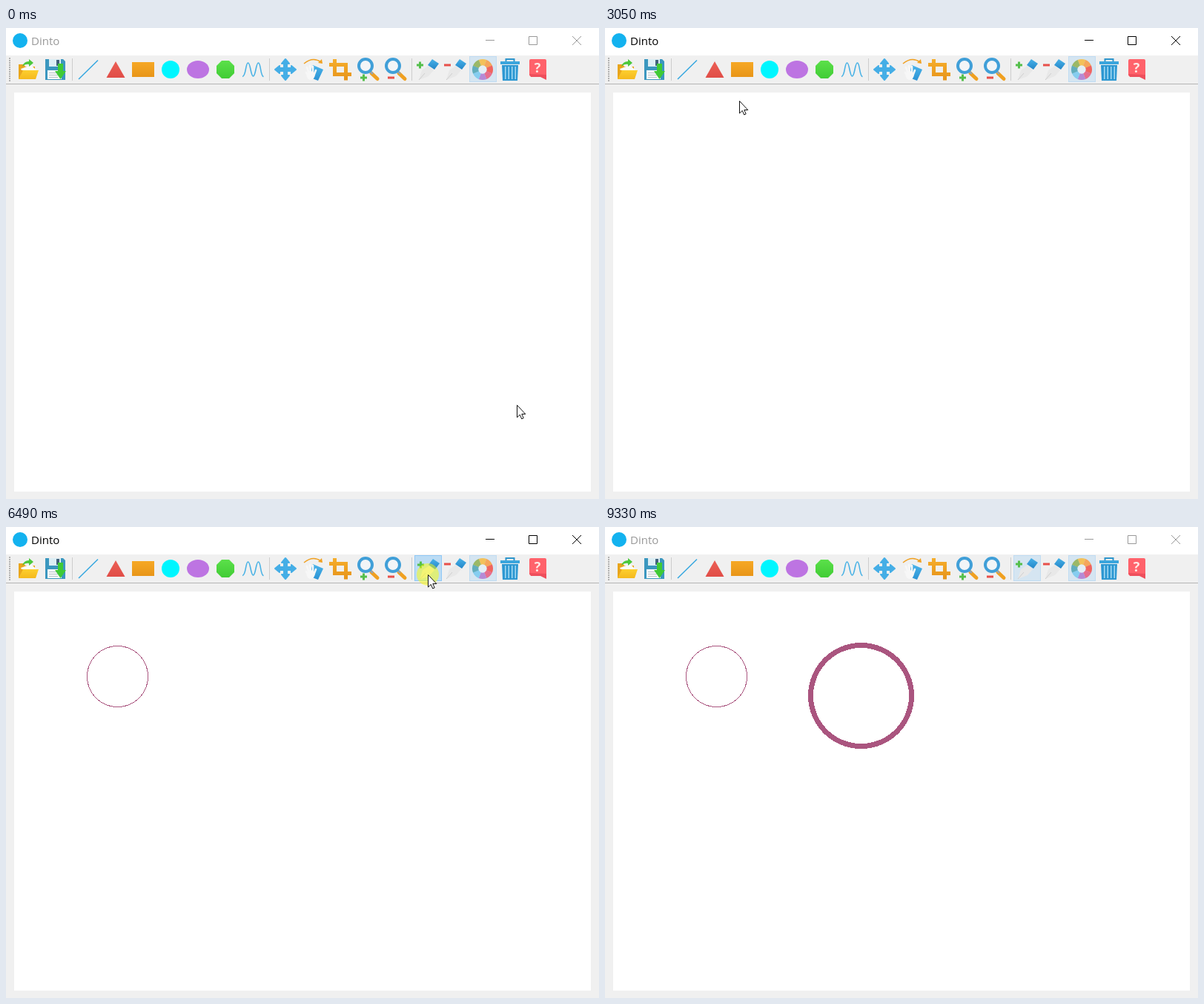
An HTML page with a canvas that plays this animation: 800x635 px, repeating every 9.41 s.

```html
<!DOCTYPE html>
<html lang="en">
<head>
<meta charset="utf-8">
<title>Dinto</title>
<style>
  html, body { margin: 0; width: 100%; height: 100%; overflow: hidden; background: #f0f0f0; }
  canvas { display: block; }
</style>
</head>
<body>
<canvas id="stage" width="800" height="635"></canvas>
<script>
const ctx = document.getElementById('stage').getContext('2d');
const LOOP = 9410;
const INK = '#aa557f';
const BLUE = '#3fa7e0', ORANGE = '#f0a020', GREEN = '#4cc83c', RED = '#e8504a';

// Pointer moves: start, end, steps, from, control, to. Drags begin with a press in place.
const moves = [
  { t0: 70, t1: 390, n: 5, a: [689, 508], c: [650, 290], b: [612, 71] },
  { t0: 2180, t1: 2820, n: 9, a: [612, 71], c: [411, 187], b: [210, 64] },
  { t0: 3050, t1: 3210, n: 3, a: [210, 64], c: [170, 117], b: [109, 159] },
  { t0: 3360, t1: 3680, n: 5, a: [109, 160], c: [155, 200], b: [201, 241], drag: 1 },
  { t0: 3910, t1: 4550, n: 9, a: [201, 241], c: [385, 152], b: [569, 64] },
  { t0: 6660, t1: 7210, n: 8, a: [569, 64], c: [395, 123], b: [222, 62] },
  { t0: 7440, t1: 7760, n: 5, a: [222, 62], c: [247, 106], b: [272, 150] },
  { t0: 7920, t1: 8400, n: 7, a: [277, 159], c: [328, 246], b: [412, 317], drag: 7 },
  { t0: 8550, t1: 8790, n: 4, a: [412, 317], c: [564, 438], b: [716, 559] }
];
const presses = [
  [700, 860], [1090, 1170], [1560, 1710], [2820, 3050], [3360, 3910],
  [4860, 4940], [5170, 5250], [5480, 5560], [5870, 5950], [6260, 6340],
  [6490, 6660], [7210, 7440], [7920, 8550]
];

function progress(m, t) {
  const k = Math.floor((t - m.t0) / (m.t1 - m.t0) * (m.n - 1) + 0.01);
  return Math.min(1, m.drag ? k / (m.n - 1) : (k + 1) / m.n);
}

function along(m, u) {
  const v = 1 - u;
  return m.a.map((a, i) => v * v * a + 2 * u * v * m.c[i] + u * u * m.b[i]);
}

function pointer(t) {
  let p = moves[0].a;
  for (const m of moves) if (t >= m.t0) p = along(m, progress(m, t));
  return p.map(Math.round);
}

function shape(d, fill, stroke, width = 1) {
  const p = new Path2D(d);
  if (fill) { ctx.fillStyle = fill; ctx.fill(p); }
  if (stroke) { ctx.strokeStyle = stroke; ctx.lineWidth = width; ctx.stroke(p); }
}

function rect(x, y, w, h, fill) {
  ctx.fillStyle = fill;
  ctx.fillRect(x, y, w, h);
}

function oval(x, y, rx, ry, fill, stroke, width) {
  ctx.beginPath();
  ctx.ellipse(x, y, rx, ry, 0, 0, 7);
  if (fill) { ctx.fillStyle = fill; ctx.fill(); }
  if (stroke) { ctx.strokeStyle = stroke; ctx.lineWidth = width; ctx.stroke(); }
}

function fade(y0, y1, c0, c1) {
  const g = ctx.createLinearGradient(0, y0, 0, y1);
  g.addColorStop(0, c0);
  g.addColorStop(1, c1);
  return g;
}

function sign(x, y, plus) {
  rect(x - 4, y - 1.5, 9, 3, plus ? '#55bf4c' : RED);
  if (plus) rect(x - 1, y - 4.5, 3, 9, '#55bf4c');
}

// Hard-edged ring, row by row
function ring(cx, cy, r, width) {
  const ro = r + width / 2, ri = r - width / 2;
  const edge = (q, dy) => Math.sqrt(Math.max(0, q * q - dy * dy));
  for (let y = Math.floor(cy - ro); y <= cy + ro; y++) {
    const dy = y + 0.5 - cy;
    if (Math.abs(dy) > ro) continue;
    const out = edge(ro, dy), inn = ri > 0 ? edge(ri, dy) : 0;
    const l = Math.round(cx - out), rr = Math.round(cx + out);
    if (!inn) { rect(l, y, rr - l, 1, INK); continue; }
    const l2 = Math.max(l + 1, Math.round(cx - inn));
    const r2 = Math.min(rr - 1, Math.round(cx + inn));
    rect(l, y, l2 - l, 1, INK);
    rect(r2, y, rr - r2, 1, INK);
  }
}

function drawing(t) {
  for (const m of moves) {
    if (!m.drag || t < m.t0) continue;
    const u = progress(m, t);
    const [x, y] = along(m, Math.max(0, u - 0.03 * (1 - u)));
    const x0 = m.a[0] + 0.5, y0 = Math.round(m.a[1]) + 0.5;
    const d = Math.min(x - m.a[0], y - m.a[1]) + 1;
    if (u > 0) ring(x0 + d / 2, y0 + d / 2, d / 2, m.drag);
  }
}

function zoom(x, plus) {
  ctx.lineCap = 'round';
  shape(`M${x + 5} 61l8 7.5`, null, ORANGE, 5);
  shape(`M${x + 3} 58l3 3`, null, '#9aa4aa', 3);
  ctx.lineCap = 'butt';
  oval(x - 3, 51, 9, 9, '#f2f5f7', '#409fd8', 4);
  sign(x - 6, 67, plus);
}

function pen(x, plus) {
  shape(`M${x - 12} 70l4-13 9-6 7 6-7 8z`, '#e8e8e8');
  shape(`M${x - 12} 70l8-9`, null, '#cfcfcf');
  shape(`M${x} 50l6-8 9 6-6 8z`, fade(42, 56, '#47b1e8', '#2486c8'));
  sign(x - 11, 50, plus);
}

const icons = [
  [30, () => {
    shape('M17 69V49h7l2 3h13v5z', '#e9a51c');
    shape('M20 55l14-5 7 7H21z', '#fafafa');
    shape('M17 69l6-12h21l-4 12z', fade(56, 69, '#fdd131', '#f5b91e'));
    shape('M22 52q2-7 9-7v-3l6 5-6 5v-3q-5-1-9 3z', GREEN);
  }],
  [67, () => {
    shape('M53 42h24l3 3v25H53z', '#3b97bf');
    rect(58, 42, 16, 10, '#dceef5');
    rect(68, 43, 4, 8, '#41617a');
    rect(56, 57, 19, 12, '#f8f8f8');
    for (let y = 60; y < 68; y += 3) rect(58, y, 12, 1, '#b8c4ca');
    shape('M70 48h7v10h4l-7.500 11-7.500-11h4z', '#3fca35');
  }],
  [111, () => shape('M98 69l26-25.500', null, '#35a7e0', 1.5)],
  [148, () => shape('M148 45l12.500 22h-25z', fade(45, 67, '#ec5f55', '#e04d47'))],
  [185, () => rect(170, 46, 30, 20, fade(46, 66, '#f6a825', '#e89518'))],
  [222, () => oval(222, 56, 12, 12, '#00f6ff')],
  [259, () => oval(259, 56, 15, 12, '#bd74e2')],
  [296, () => shape('M291 44h10l7 7v10l-7 7h-10l-7-7V51z', fade(44, 68, '#5be04a', '#41cc35'))],
  [333, () => shape('M319 65.500C324 65 323 47 326.500 47S330 65 333.500 65 337 47 340.500 47 343 65 347.500 65.500', null, '#49b2e5', 1.6)],
  [377, () => {
    ctx.lineJoin = 'round';
    shape('M377 42l5 6h-3v6h6v-3l6 5-6 5v-3h-6v6h3l-5 6-5-6h3v-6h-6v3l-6-5 6-5v3h6v-6h-3z', '#45aee6', '#45aee6', 2);
    ctx.lineJoin = 'miter';
  }],
  [414, () => {
    shape('M402 48q12-10 23-2', null, ORANGE, 1.5);
    shape('M427 48l-6-1 5-5z', ORANGE);
    shape('M414 50l14 6-7 15-13-5z', fade(50, 71, '#4bb4ea', '#2b93d4'));
    ctx.lineCap = 'round';
    shape('M405 60l3 5M406 53l3 9M410 51l1 10M414 52l0 10M418 57l-3 8', null, '#f7f7f7', 2.6);
    ctx.lineCap = 'butt';
    oval(411, 64, 5.5, 6, '#f7f7f7');
  }],
  [451, () => {
    const c = fade(42, 71, '#f6ae2c', '#e6931a');
    shape('M443.500 42v20.500h22.500M436 49.500h22.500v21', null, c, 5);
  }],
  [488, () => zoom(488, true)],
  [525, () => zoom(525, false)],
  [569, () => pen(569, true)],
  [606, () => pen(606, false)],
  [643, () => {
    const hues = ['#f3c15b', '#f5a65c', '#f0655f', '#e66f8e', '#b58ad6', '#86cdf0', '#62aebd', '#9bb867'];
    hues.forEach((h, i) => {
      const a = (i / 8 - 0.25) * Math.PI * 2 - 0.4;
      ctx.beginPath();
      ctx.arc(643, 56, 14, a, a + 0.8);
      ctx.arc(643, 56, 5.5, a + 0.8, a, true);
      ctx.fillStyle = h;
      ctx.fill();
    });
    oval(643, 56, 5.5, 5.5, '#e4eef5');
  }],
  [680, () => {
    shape('M674.500 46v-4h11v4', null, '#2f95cc', 2);
    rect(667, 45, 26, 4, '#3aa5dc');
    shape('M669 50h22l-1 21h-20z', '#2d98d2');
    for (let x = 673; x < 690; x += 4.5) rect(x, 52, 1.5, 17, '#a5daf3');
  }],
  [717, () => {
    shape('M708 42h19q2 0 2 2v25l-6-4h-15q-2 0-2-2V44q0-2 2-2z', '#ff626b');
    shape('M706 62l2 4h13l8 4v-7z', '#ee4f5c');
    ctx.font = 'bold 18px "Open Sans", sans-serif';
    ctx.textAlign = 'center';
    ctx.fillStyle = '#ffe9e6';
    ctx.fillText('?', 717, 60);
    ctx.textAlign = 'left';
  }]
];

function titleBar(active) {
  const c = active ? '#000' : '#999';
  rect(0, 0, 800, 37, '#fff');
  oval(19, 17, 10, 10, '#13b2ef');
  ctx.font = '15px "Open Sans", "Noto Sans", sans-serif';
  ctx.fillStyle = c;
  ctx.fillText('Dinto', 34, 23);
  rect(647, 16, 12, 1, c);
  shape('M705.500 11.500h11v11h-11z', null, c);
  shape('M764 11l12 12M776 11l-12 12', null, c);
}

function toolBar(t, down, px, py) {
  rect(0, 75, 800, 1, '#b4b4b4');
  for (let y = 40; y < 71; y += 3) rect(4, y, 2, 2, '#b0b0b0');
  for (const x of [89, 355, 547]) rect(x, 41, 1, 30, '#cdcdcd');
  for (const [x, draw] of icons) {
    const left = x - 18;
    const pressed = down && py < 73 && px >= left && px < left + 37;
    const lit = x === 643 || (x === 569 && t >= 4860);
    if (pressed || lit) {
      rect(left, 38, 37, 35, pressed ? '#90c8f6' : '#c0dcf3');
      rect(left + 1, 39, 35, 33, pressed ? '#bcdcf4' : '#d5e5f1');
    }
    ctx.save();
    if (pressed) ctx.translate(1, 1);
    draw();
    ctx.restore();
  }
}

function render(t) {
  const [px, py] = pointer(t);
  const down = presses.some(([a, b]) => t >= a && t < b);
  rect(0, 0, 800, 635, '#f0f0f0');
  titleBar(t >= 700 && t < 9330);
  toolBar(t, down, px, py);
  rect(11, 87, 778, 538, '#fff');
  drawing(t);
  if (down) oval(px, py, 15, 15, 'rgba(255,255,0,.5)');
  if (t < 8870) {
    ctx.save();
    ctx.translate(px, py);
    shape('M.5 .5V17l3.800-3.600 2.400 5.600 2.500-1.100-2.400-5.400h5z', '#fff', '#111');
    ctx.restore();
  }
}

const start = performance.now();
function tick() {
  render((performance.now() - start) % LOOP);
  requestAnimationFrame(tick);
}
tick();
</script>
</body>
</html>
```
